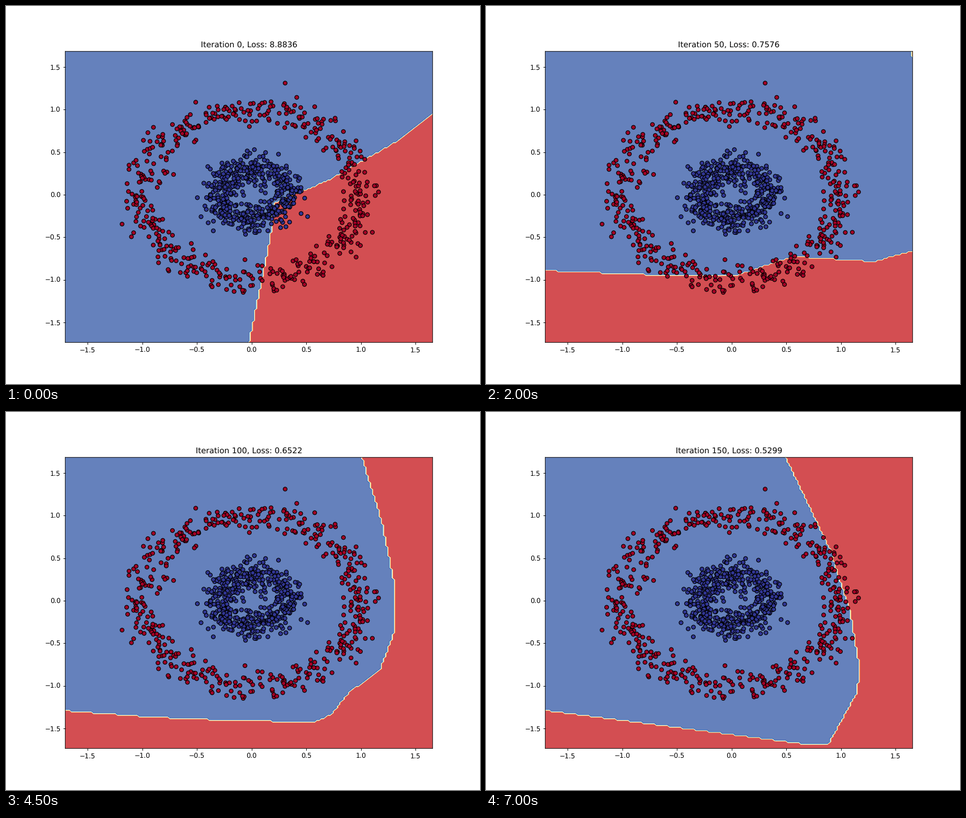
A matplotlib script for the animation above (8 s loop, 837 by 669 pixels).

```python
import numpy as np
import matplotlib.pyplot as plt
from matplotlib.animation import FuncAnimation
from matplotlib.path import Path

W, H, DPI = 837, 669, 83.7
FRAMES, INTERVAL = 16, 500
SAMPLES, FACTOR, NOISE = 1000, 0.3, 0.09

GX = -1.704 + 0.02 * np.arange(169)
GY = -1.735 + 0.02 * np.arange(172)
LOW_LEFT, LOW_RIGHT, TOP_RIGHT = (-1.8, -1.8), (1.8, -1.8), (1.8, 1.8)

# Iteration, loss and the corners of the region predicted as the outer class.
STATES = [
    (0, 8.8836, [(1.69, 0.98), (1.34, 0.64), (0.7, 0.17), (0.21, -0.09),
                 (0.17, -0.5), (-0.03, -1.77), LOW_RIGHT]),
    (50, 0.7576, [(-1.73, -0.888), (-0.46, -0.952), (0.03, -0.952),
                  (0.55, -0.723), (1.3, -0.783), (1.69, -0.643),
                  (1.69, 1.62), (1.65, 1.62), (1.65, 1.8),
                  TOP_RIGHT, LOW_RIGHT, LOW_LEFT]),
    (100, 0.6522, [(1.0, 1.72), (1.193, 0.91), (1.297, 0.25), (1.297, -0.39),
                   (1.17, -0.82), (0.89, -1.075), (0.73, -1.33),
                   (0.577, -1.424), (-0.17, -1.407), (-0.9, -1.367),
                   (-1.73, -1.288), LOW_LEFT, LOW_RIGHT, TOP_RIGHT]),
    (150, 0.5299, [(0.48, 1.72), (0.91, 0.57), (1.085, -0.15), (1.17, -0.8),
                   (1.147, -1.07), (0.883, -1.69), (0.634, -1.677),
                   (-1.73, -1.283), LOW_LEFT, LOW_RIGHT, TOP_RIGHT]),
]


def make_circles(rng):
    """Two noisy concentric rings; label 0 is the outer one."""
    half = SAMPLES // 2
    ang = np.linspace(0, 2 * np.pi, half, endpoint=False)
    ring = np.column_stack([np.cos(ang), np.sin(ang)])
    pts = np.vstack([ring, FACTOR * ring])
    pts += rng.normal(scale=NOISE, size=pts.shape)
    return pts, np.repeat([0, 1], half)


def classify(corners):
    """Class of every grid node: 0 inside the polygon, 1 elsewhere."""
    xx, yy = np.meshgrid(GX, GY)
    nodes = np.column_stack([xx.ravel(), yy.ravel()])
    red = Path(corners).contains_points(nodes)
    return np.where(red, 0.0, 1.0).reshape(xx.shape)


plt.rcParams.update({"font.family": "DejaVu Sans",
                     "text.hinting": "none",
                     "path.snap": False})
# The tiny margin keeps the pixel size from rounding down.
fig, ax = plt.subplots(figsize=((W + 1e-4) / DPI, (H + 1e-4) / DPI), dpi=DPI)

fills = [ax.contourf(GX, GY, classify(corners), cmap="RdYlBu", alpha=0.8)
         for _, _, corners in STATES]
points, labels = make_circles(np.random.RandomState(42))
ax.scatter(*points.T, c=labels, cmap="RdYlBu", edgecolors="k")
ax.set_xlim(GX[0], GX[-1])
ax.set_ylim(GY[0], GY[-1])
title = ax.set_title("")


def update(i):
    # The first state lasts one tick, the others five each.
    state = (i + 4) // 5
    for k, fill in enumerate(fills):
        fill.set_visible(k == state)
    iteration, loss, _ = STATES[state]
    title.set_text(f"Iteration {iteration}, Loss: {loss:.4f}")
    return [*fills, title]


anim = FuncAnimation(fig, update, frames=FRAMES, interval=INTERVAL,
                     repeat=True, repeat_delay=0, blit=False)
plt.show()
```
